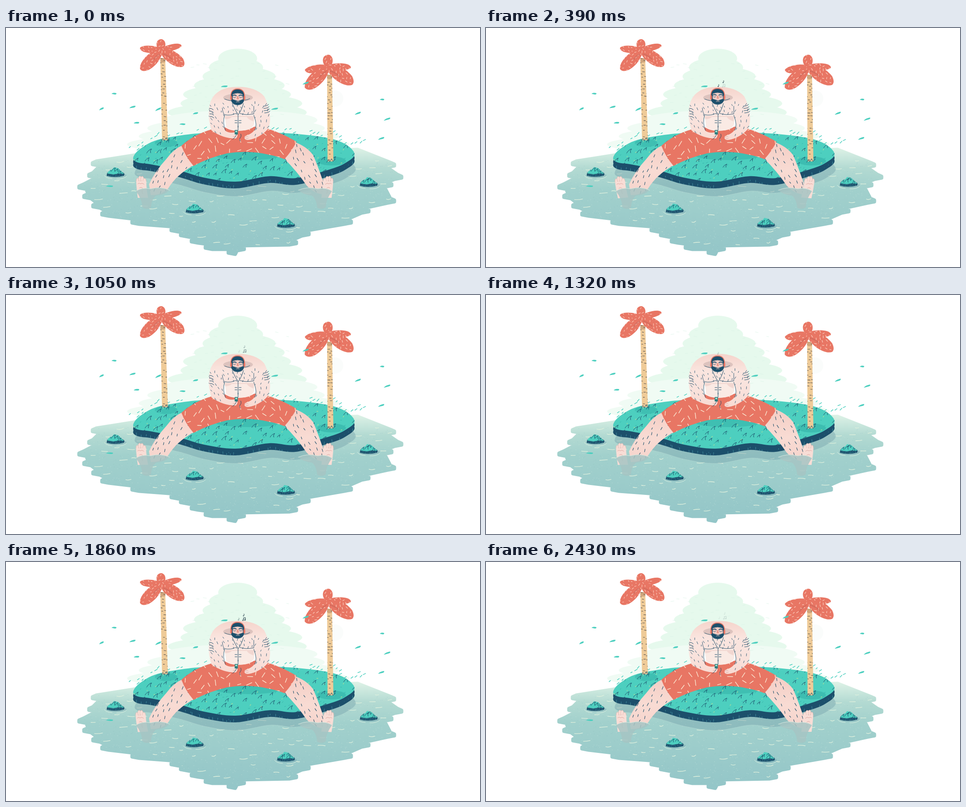
An HTML page that plays this animation: 1054x532 px, repeating every 2460 ms.

```html
<!DOCTYPE html>
<html lang="en">
<head>
<meta charset="utf-8">
<title>Island</title>
<style>
  html, body { margin: 0; width: 100%; height: 100%; overflow: hidden; background: #fff; }
  svg { display: block; width: 100vw; height: 100vh; }
  .foot { transform-origin: 306px 374px; animation: tap 1230ms linear infinite; }
  .head { animation: nod 1230ms ease-in-out infinite; }
  .bob { animation: bob 1230ms ease-in-out infinite; }
  .note { opacity: 0; animation: 1230ms linear infinite; }
  .n1 { animation-name: n1; }
  .n2 { animation-name: n2; }
  .n3 { animation-name: n3; }
  @keyframes tap {
    0%, 100% { transform: rotate(0); }
    12% { transform: rotate(-1.5deg); }
    31% { transform: rotate(-5deg); }
    40% { transform: rotate(-2.6deg); }
    66% { transform: rotate(-2deg); }
  }
  @keyframes nod { 0%, 100% { transform: translateY(.6px); } 45% { transform: translateY(-.8px); } }
  @keyframes bob { 0%, 100% { transform: translateY(0); } 50% { transform: translateY(-.5px); } }
  @keyframes n1 {
    0% { opacity: 0; transform: translate(516px, 130px); }
    8% { opacity: .35; }
    25%, 37% { opacity: 1; }
    60% { opacity: .35; }
    97% { opacity: .12; }
    100% { opacity: 0; transform: translate(519px, 124px); }
  }
  @keyframes n2 {
    0%, 12% { opacity: 0; transform: translate(527px, 121px); }
    30%, 65% { opacity: 1; }
    97% { opacity: .15; }
    100% { opacity: 0; transform: translate(531px, 114px); }
  }
  @keyframes n3 {
    0%, 25% { opacity: 0; transform: translate(528px, 129px); }
    32% { opacity: .2; }
    50%, 72% { opacity: 1; }
    97% { opacity: .22; }
    100% { opacity: 0; transform: translate(531px, 124px); }
  }
</style>
</head>
<body>
<svg id="stage" viewBox="0 0 1054 532" xmlns="http://www.w3.org/2000/svg"></svg>
<script>
const NAVY = '#1c4f6b', TEAL = '#4dcfbf', SKIN = '#f8ddd6', RED = '#e87664', CREAM = '#fbe9d3';

const randomizer = seed => () => {
  seed = (seed * 1664525 + 1013904223) % 4294967296;
  return seed / 4294967296;
};
const at = (x, y) => `${x.toFixed(1)} ${y.toFixed(1)}`;

// Spread marks over a box, keeping a minimum distance between them
function scatter(seed, [x, y, w, h], count, gap, mark) {
  const rnd = randomizer(seed), spots = [];
  let out = '';
  for (let i = 0; i < count * 12 && spots.length < count; i++) {
    const px = x + rnd() * w, py = y + rnd() * h;
    if (spots.some(s => Math.hypot(s[0] - px, s[1] - py) < gap)) continue;
    spots.push([px, py]);
    out += mark(px, py, rnd);
  }
  return out;
}

// Closed smooth curve through a few points
function smooth(p) {
  const n = p.length, pt = i => p[(i + n) % n];
  const handle = (i, s) => at(...[0, 1].map(k => pt(i)[k] + s * (pt(i + 1)[k] - pt(i - 1)[k]) / 6));
  return `M${p[0]}` + p.map((_, i) => `C${handle(i, 1)} ${handle(i + 1, -1)} ${pt(i + 1)}`).join('') + 'Z';
}

const dash = (len, angle, spread) => (x, y, rnd) => {
  const a = (angle + (rnd() - .5) * spread) * Math.PI / 180, l = len * (.7 + rnd() * .6);
  const dx = Math.cos(a) * l, dy = Math.sin(a) * l;
  return `M${at(x - dx / 2, y - dy / 2)}l${at(dx, dy)}`;
};
const hook = (x, y, rnd) => {
  const s = .6 + rnd() * .5;
  return `M${at(x, y)}q${at(3 * s, -6 * s)} ${at(10 * s, -8 * s)}q${at(-4 * s, 4 * s)} ${at(-2 * s, 8 * s)}`;
};
const speck = (x, y) => `M${at(x, y)}h.6`;
const ripple = (x, y, rnd) => {
  const w = 6 + rnd() * 12;
  return `M${at(x, y)}q${at(w / 2, rnd() * 4 - 1)} ${at(w, rnd() * 3 - 2)}`;
};

const fill = (d, color, extra = '') => `<path d="${d}" fill="${color}" ${extra}/>`;
const line = (d, color, width = 1, extra = '') =>
  `<path d="${d}" fill="none" stroke="${color}" stroke-width="${width}" stroke-linecap="round" stroke-linejoin="round" ${extra}/>`;
const oval = (x, y, rx, ry, color, extra = '') => `<ellipse cx="${x}" cy="${y}" rx="${rx}" ry="${ry}" fill="${color}" ${extra}/>`;
const move = (x, y, art, more = '') => `<g transform="translate(${x} ${y}) ${more}">${art}</g>`;
const mirror = (art, axis) => move(axis, 0, art, 'scale(-1 1)');

let clips = 0;
function textured(d, color, inner, extra = '') {
  const id = 'c' + clips++;
  return `<clipPath id="${id}"><path d="${d}"/></clipPath>${fill(d, color, extra)}<g clip-path="url(#${id})">${inner}</g>`;
}

// Mist: puffs that widen row by row
function backdrop() {
  const rnd = randomizer(12);
  const row = (y, half, color) => oval(517 + (rnd() - .5) * 14, y, half, 22, color);
  let art = oval(732, 157, 18, 18, '#fafcfb');
  for (let y = 68; y < 190; y += 20) art += row(y, 34 + (y - 60) * .92 + rnd() * 8, '#e6f9ed');
  for (let y = 205; y < 260; y += 18) art += row(y, 165 + (y - 200) * 1.4, '#f0fbf4');
  return art + line(scatter(4, [410, 70, 220, 130], 60, 12, dash(6, 0, 30)), '#d9f3e5', .7);
}

// Shoreline: each key point is the tip of a finger of water
function shore(tips, inward) {
  return tips.map(([x, y]) => `L${x + inward * 9} ${y - 6}L${x} ${y - 2}L${x} ${y + 2}L${x + inward * 16} ${y + 5}`).join('');
}

function water() {
  const west = [[192, 302], [184, 328], [162, 354], [173, 375], [193, 396], [213, 414], [280, 432], [367, 449], [388, 460], [412, 474], [443, 488], [494, 499]];
  const east = [[864, 305], [880, 332], [858, 349], [864, 385], [807, 407], [768, 432], [674, 458], [646, 478], [530, 491]];
  const down = shore(west, 1), up = shore(east, -1).split('L').slice(1).reverse().join('L');
  const d = `M290 282${down}L${up}L782 270Z`;
  const area = [165, 295, 710, 200];
  return textured(d, 'url(#sea)',
    line(scatter(9, area, 800, 2, speck), '#d6ece2', 1, 'opacity=".45"')
    + line(scatter(10, area, 600, 2, speck), '#79aeb4', .9, 'opacity=".35"')
    + line(scatter(18, area, 150, 18, ripple), '#dff0dd', 1.3),
    'stroke="url(#sea)" stroke-width="7" stroke-linejoin="round"');
}

function island() {
  const turf = [[283, 288], [300, 268], [345, 247], [450, 233], [600, 233], [700, 242], [750, 256], [775, 280], [757, 299], [722, 314],
    [645, 334], [585, 330], [510, 342], [440, 333], [385, 317], [325, 304], [292, 299]];
  const d = smooth(turf), box = [282, 232, 495, 112];
  const cliff = textured(d, NAVY, line(scatter(21, [282, 275, 495, 70], 230, 5, dash(7, 90, 14)), '#4b9da9', .8));
  return move(3, 33, fill(d, '#719fa8', 'opacity=".4"') + line(d, '#b9dcd5', .8, 'opacity=".6"'))
    + move(0, 15, cliff) + move(0, 8, fill(d, NAVY))
    + textured(d, TEAL,
      oval(356, 256, 25, 9, '#2ba69f', 'opacity=".4"') + oval(724, 296, 32, 10, '#2ba69f', 'opacity=".45"')
      + oval(538, 284, 72, 10, '#2ba69f', 'opacity=".4"')
      + line(scatter(23, box, 150, 7, dash(3, -30, 60)), '#35b3aa', 1)
      + line(scatter(24, box, 70, 15, dash(2, -30, 80)), '#a8dc9d', 1.4)
      + line(scatter(25, box, 125, 15, hook), NAVY, 1))
    + line(turf.slice(1, 7).map(([x, y], i) => scatter(30 + i, [x - 25, y - 14, 75, 16], 9, 7, dash(5, -35, 30))).join(''), TEAL, 1.5);
}

function leaf(angle, len, width, seed) {
  const d = `M-5 0C${len * .1} ${-width * .9} ${len * .5} ${-width * 1.3} ${len * .84} ${-width * .8}Q${len * 1.04} ${-width * .3} ${len} ${width * .25}C${len * .85} ${width * 1.2} ${len * .2} ${width * 1.3} -5 0Z`;
  const seeds = scatter(seed, [-5, -14, 75, 28], 34, 6.5, dash(3.8, 20, 110));
  return move(0, 0, textured(d, RED, line(seeds, '#ffd9c9', 1)), `rotate(${angle})`);
}

function palm(x, y, foot, droop, size, seed) {
  const top = y + 18, bole = `M${x - 2} ${top}h11L${foot[0] + 7} ${foot[1]}h-13Z`;
  const ticks = scatter(seed, [x - 4, top, 22, foot[1] - top], 56, 5.5, dash(4, 4, 14));
  const crown = leaf(184 - droop, 47, 8, seed + 1) + leaf(droop - 13, 46, 7, seed + 2) + leaf(-91, 24, 10, seed + 3)
    + oval(0, 3, 12, 9, RED) + leaf(135, 63, 14, seed + 4) + leaf(34, 61, 14, seed + 5)
    + line('M-4 10q-7 3 -13 12M5 9q10 3 19 11', '#a9584f', 2.5, 'opacity=".3"');
  return textured(bole, '#efcb98', line(ticks, '#5b5550', 1.1) + oval(x + 4, top + 2, 10, 8, '#a06f55', 'opacity=".4"'))
    + move(x, y, crown, `scale(${size})`)
    + line(`M${foot[0] - 8} ${foot[1] + 2}l4 -6l3 5l4 -7l3 6l5 -5`, NAVY, 1);
}

function drift() {
  const rnd = randomizer(8);
  const spots = [[240, 146], [212, 180], [281, 176], [338, 181], [392, 214], [290, 211], [421, 190], [485, 130], [597, 180],
    [666, 123], [836, 159], [782, 190], [847, 203], [834, 246], [230, 352]];
  return spots.map(([x, y]) => {
    const w = 9 + rnd() * 7;
    return move(x, y, fill(`M${-w / 2} 1Q${-w / 5} -3 ${w / 2} -1.4Q${w / 2 + 1} 2 ${w / 6} 1.8Z`, TEAL), `rotate(${5 - rnd() * 30})`);
  }).join('');
}

function rock(x, y, seed) {
  const top = 'M-18 3Q-15 -4 -7 -6L-3 -11L6 -9L17 1L19 4L8 3L-4 5Z';
  return move(x, y, oval(2, 7, 23, 6, '#719fa8', 'opacity=".35"') + line('M-25 7q5 7 18 7M3 15q15 1 22 -6', '#d9eee0', 1)
    + '<g class="bob">' + fill('M-18 1L-19 8Q-2 13 19 8Q22 4 18 1Z', NAVY)
    + textured(top, TEAL, line(scatter(seed, [-18, -5, 32, 9], 6, 6, hook), NAVY, 1))
    + line(scatter(seed, [-16, 6, 32, 2], 9, 3, dash(3, 90, 10)), '#4b9da9', .7) + '</g>');
}

function foot() {
  let toes = '';
  for (let i = 0; i < 4; i++) toes += oval(292.5 + i * 5.2, 340 - 5 * Math.sin(i * 1.1), 2.8 + i * .3, 6, SKIN, 'stroke="#e2aaa3" stroke-width=".6"');
  return '<g class="foot">' + toes + fill('M289.500 341L312 341Q312 358 316 378L293 378Q290 356 289.500 341Z', SKIN)
    + line('M293 347q3 -3 6 0q4 -3 8 1M297 356q4 -3 7 1M303 361q-2 4 1 8', '#dca59f', 1) + '</g>';
}

function legs() {
  const left = 'M394 260Q372 270 357 291Q332 318 318 348L322 372Q346 372 360 358Q380 325 419 305Z';
  const right = 'M642 254Q668 263 683 283Q693 306 707 347L703 370Q684 368 668 350Q648 320 618 290Z';
  const hair = (seed, x, angle) => line(scatter(seed, [x, 260, 108, 110], 58, 9.5, dash(5.5, angle, 36)), NAVY, 1.1);
  const dip = fill('M289 363Q303 354 320 358Q345 352 363 361Q354 371 334 373Q324 380 322 400Q313 406 303 399Q303 382 289 363Z', '#a6c5c4', 'opacity=".85"')
    + line('M289 363Q303 354 321 358Q345 352 364 361', '#d4e8df', 1);
  return textured(left, 'url(#calf)', hair(43, 312, 115)) + textured(right, 'url(#calf)', hair(44, 612, 65))
    + foot() + mirror(foot(), 1017) + dip + mirror(dip, 1014);
}

function shorts() {
  const d = 'M456 226Q418 237 390 262Q399 286 417 307Q452 288 492 279Q540 271 584 282Q602 285 619 292Q635 275 646 253Q616 235 579 223L548 219L490 220Z';
  return textured(d, RED, line(scatter(52, [388, 220, 260, 86], 85, 14, dash(10, 0, 360)), CREAM, 1.4));
}

function torso() {
  const body = 'M457 228C448 200 447 163 467 146C480 134 498 131 516 131C542 131 562 138 574 152C584 170 592 202 584 222C577 234 556 247 540 249Q528 251 531 241Q546 236 552 228Q560 220 551 194L486 194Q479 214 488 229Q497 235 510 232Q519 238 511 246Q482 246 457 228Z';
  const armHair = (seed, x, angle) => scatter(seed, [x, 165, 36, 74], 27, 9, dash(4.5, angle, 50));
  let creases = '';
  for (let i = 0; i < 4; i++) creases += `M${452 + i * .4} ${179 + i * 6}q5 -1 9 3M${572 + i} ${174 + i * 5}q8 0 12 -4`;
  let ribs = '';
  for (let i = 0; i < 2; i++) ribs += `M509 ${206 + i * 5}h5M518 ${206 + i * 5}h5`;
  return fill('M479 212Q488 228 516 229Q548 228 558 213L548 198L488 198Z', '#fff')
    + fill('M484 182L554 182L552 213Q548 226 530 228Q505 230 490 222Z', '#faeae4')
    + fill('M486 196h66l-2 12q-14 -6 -14 -10h-34q-4 5 -15 5z', '#e7bfb8', 'opacity=".45"')
    + textured(body, 'url(#back)', oval(516, 155, 33, 9, '#d9bfba', 'opacity=".85"')
      + line(armHair(63, 450, 72) + armHair(64, 552, 105) + scatter(65, [488, 170, 60, 22], 20, 7, dash(3.5, 80, 60)), NAVY, .9))
    + line('M486 158q14 6 23 3M523 160q12 2 19 -3M481 178Q482 190 486 193Q500 196 511 190M520 190Q532 195 551 191L551 174M486 194Q481 212 488 228M551 194Q560 217 553 228', NAVY, .9)
    + line(creases + ribs + 'M516 218v3', NAVY, 1)
    + line('M531 243l7 -2M533 247l6 -2M505 242l6 -2', '#d69c95', .8)
    + line('M503 168Q509 182 516 193Q524 183 528 168M516 193V228M522 236q2 5 -1 8t0 8M513 237q-4 8 -9 11', NAVY, 1)
    + '<rect x="508.500" y="227" width="7" height="10" rx="1" fill="#2b7d7d"/><rect x="510" y="228.500" width="4" height="3.500" fill="#a8e1cf"/>';
}

function head() {
  let face = '';
  for (const x of [504, 518]) face += line(`M${x} 150q4 -2.500 8 0`, NAVY, 1.8) + line(`M${x + 1} 153.500q3 2 6 0`, NAVY, .9);
  for (const x of [500.5, 530]) face += oval(x, 155, 2, 5, RED);
  return '<g class="head">'
    + fill(smooth([[500, 156], [503, 140], [515, 135], [527, 140], [530, 156], [526, 167], [515, 171], [504, 167]]), NAVY)
    + fill('M504 147Q515 142 526 147L527 158L516 162L504 158Z', '#f5cfc7')
    + face + fill('M513.500 151h3l1.500 7h-5z', '#e99a8e') + line('M512 164q3 -1 7 0', '#f1c3b9', 1.2)
    + line('M500 156Q498 135 515 135Q532 135 530.500 156', RED, 1.8) + '</g>';
}

function notes() {
  const ink = '#263f4b';
  const single = oval(-.8, 2, 1.2, .9, ink) + line('M.2 1.800V-2.400q.4 1.400 1.400 1.800', ink, .7);
  const pair = oval(-2.3, 2.5, 1.5, 1.1, ink) + oval(2.1, 1.9, 1.5, 1.1, ink) + line('M-1 2.300V-2.600L3.300 -3.200V1.700', ink, 1.1);
  return [single, single, pair].map((art, i) => `<g class="note n${i + 1}">${art}</g>`).join('');
}

const ramp = (id, y1, y2, stops) =>
  `<linearGradient id="${id}" gradientUnits="userSpaceOnUse" x1="0" x2="0" y1="${y1}" y2="${y2}">`
  + stops.map((c, i) => `<stop offset="${i / (stops.length - 1)}" stop-color="${c}"/>`).join('') + '</linearGradient>';

const rocks = [[243, 321], [419, 402], [622, 434], [806, 343]].map(([x, y], i) => rock(x, y, 111 + i)).join('');

document.getElementById('stage').innerHTML = '<defs>'
  + ramp('sea', 265, 500, ['#dff3e7', '#b3dad2', '#a1d0cc', '#9dcdcb', '#98c9c9', '#94c6c8'])
  + ramp('back', 130, 250, ['#f5d3cb', '#fae5df', '#f9e2dc', '#f8dad2'])
  + ramp('calf', 260, 375, ['#f5cfc6', '#f8dbd3', '#f6d3cb']) + '</defs>'
  + backdrop() + water() + island()
  + palm(345, 49, [353, 250], 0, 1, 70) + palm(716, 86, [721, 297], 14, 1.1, 90)
  + drift() + rocks + legs() + shorts() + torso() + head() + notes();
</script>
</body>
</html>
```
